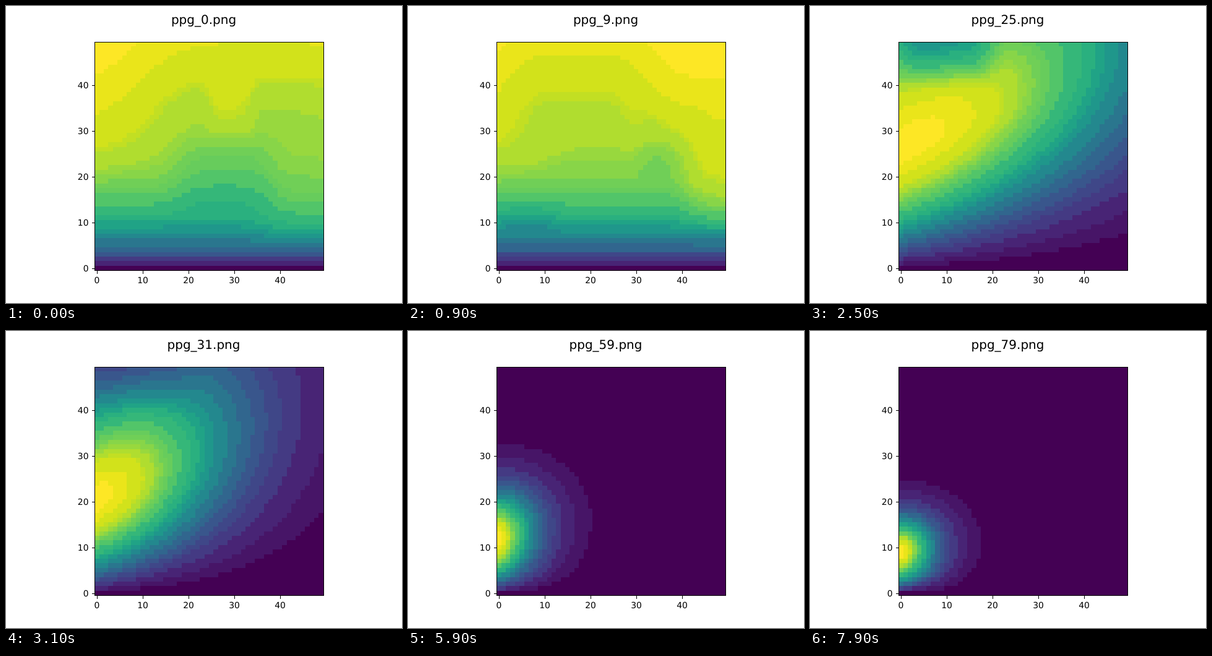
Write an HTML page with a canvas that moves like this. It is 640 by 480 pixels and loops after 8000 ms.

```html
<!DOCTYPE html>
<html lang="en">
<head>
<meta charset="utf-8">
<title>Heat map</title>
<style>
  html, body { margin: 0; width: 100%; height: 100%; overflow: hidden; background: #fff; }
  canvas, svg { position: absolute; left: 0; top: 0; display: block; }
  text {
    font-family: "DejaVu Sans", sans-serif; font-size: 13.89px; fill: #000;
    text-rendering: geometricPrecision;
  }
  #title { font-size: 20px; text-anchor: middle; }
  path { fill: none; stroke: #000; stroke-width: 1; shape-rendering: crispEdges; }
</style>
</head>
<body>
<canvas id="map" width="640" height="480"></canvas>
<svg id="axes" width="640" height="480" viewBox="0 0 640 480">
  <path d="M143.5 58.5H513.5V427.5H143.5Z"/>
  <text id="title" x="319.5" y="29"></text>
</svg>
<script>
const N = 50, FRAMES = 80, STEP = 100;
const LEFT = 143.2, BOTTOM = 427.2, CELL = 7.392;

// Colour bands: lower bound and fill
const BANDS = [
  [0, '#440154'], [.03, '#471567'], [.075, '#482475'], [.14, '#443a83'],
  [.205, '#3f4788'], [.26, '#39568c'], [.32, '#31668e'], [.385, '#2a768e'],
  [.45, '#23888e'], [.52, '#1f978b'], [.57, '#20a386'], [.615, '#2ab07f'],
  [.66, '#35b779'], [.72, '#52c569'], [.77, '#67cc5c'], [.795, '#70cf57'],
  [.82, '#88d548'], [.845, '#98d83e'], [.86, '#b0dd2f'], [.895, '#c2df23'],
  [.905, '#d2e21b'], [.953, '#eae51a'], [.985, '#fde725']
];

const mix = (a, b, w) => a + (b - a) * w;

// Smooth flat-topped hill
function hill(x, y, { cx, cy, wx, wy, rise }) {
  return rise * Math.exp(-(((x - cx) / wx) ** 4) - ((y - cy) / wy) ** 4);
}

function makeField(valueAt) {
  const field = Array.from({ length: N * N }, (_, i) => valueAt(i % N, Math.floor(i / N)));
  const top = Math.max(...field);
  return field.map(v => v / top);
}

// Saturating layers, pushed up or down by hills
function layers(...hills) {
  return makeField((x, y) => {
    const depth = hills.reduce((d, h) => d - hill(x, y, h), y);
    return 1 - Math.exp(-Math.pow(Math.max(0, depth) / 11.2, .93));
  });
}

// One source at the left edge, with its ridge leaning upwards
function blob({ centre, slope, spread, reach, power, skew, notch }) {
  const dent = { cx: 10, cy: 54, wx: 10, wy: 12, rise: notch };
  return makeField((x, y) => {
    const c = centre + slope * x;
    const d = y - c;
    const shape = d > 0
      ? Math.exp(-d * d / (2 * spread * spread))
      : Math.pow(1 - (d / c) ** 2, 1 + skew * x);
    return shape * Math.exp(-Math.pow(x / reach, power)) - hill(x, y, dent);
  });
}

const PLUME = { centre: 26, slope: .48, spread: 28, reach: 57, power: 2.4, skew: .025, notch: .25 };
const WIDE = { centre: 16.5, slope: .45, spread: 11.4, reach: 14.2, power: 1.7, skew: .04, notch: 0 };
const MID = { centre: 12, slope: .2, spread: 7.7, reach: 9, power: 1.55, skew: .04, notch: 0 };
const SMALL = { centre: 9, slope: .12, spread: 5.9, reach: 8.2, power: 1.65, skew: .04, notch: 0 };

const blends = [
  { at: 0, field: layers(
    { cx: 36, cy: 54, wx: 30, wy: 27, rise: 17 },
    { cx: 29, cy: 38, wx: 5, wy: 8, rise: -4 },
    { cx: 28, cy: 20, wx: 11, wy: 8, rise: 3.5 },
    { cx: 50, cy: 11, wx: 14, wy: 7, rise: -2 }) },
  { at: 9, field: layers(
    { cx: 17, cy: 50, wx: 18, wy: 21, rise: 14 },
    { cx: 38, cy: 29, wx: 7, wy: 8, rise: 4 },
    { cx: 51, cy: 20, wx: 10, wy: 10, rise: -6 },
    { cx: 24, cy: 24, wx: 14, wy: 4, rise: 2 },
    { cx: 6, cy: 11, wx: 7, wy: 4, rise: 1.5 }) },
  { at: 17, field: layers(
    { cx: 20, cy: 32, wx: 32, wy: 25, rise: 4.5 },
    { cx: 3, cy: 60, wx: 16, wy: 28, rise: 17 },
    { cx: 22, cy: 58, wx: 14, wy: 18, rise: 10 },
    { cx: 40, cy: 33, wx: 8, wy: 6, rise: 2.5 },
    { cx: 6, cy: 13, wx: 5, wy: 3, rise: 1.5 }) },
  { at: 25, field: blob(PLUME) }
];

const shrinks = [
  { at: 25, end: 42, from: PLUME, to: WIDE, tau: 8.5 },
  { at: 42, end: 59, from: WIDE, to: MID, tau: 9.4 },
  { at: 59, end: 79, from: MID, to: SMALL, tau: 12 }
];

function blend(n) {
  const k = blends.findIndex(b => b.at > n);
  const a = blends[k - 1], b = blends[k];
  const w = (n - a.at) / (b.at - a.at);
  const log = v => Math.log(Math.max(v, 1e-4));
  return makeField((x, y) => {
    const i = y * N + x;
    return Math.exp(mix(log(a.field[i]), log(b.field[i]), w));
  });
}

// Parameters settle exponentially
function shrink(n) {
  const { at, end, from, to, tau } = shrinks.find(s => n <= s.end);
  const w = (1 - Math.exp((at - n) / tau)) / (1 - Math.exp((at - end) / tau));
  const shape = {};
  for (const key in from) shape[key] = mix(from[key], to[key], w);
  return blob(shape);
}

function colour(v) {
  let i = BANDS.length - 1;
  while (i > 0 && v < BANDS[i][0]) i--;
  return BANDS[i][1];
}

const ctx = document.getElementById('map').getContext('2d');
const title = document.getElementById('title');
const edgeX = i => Math.round(LEFT + i * CELL);
const edgeY = i => Math.round(BOTTOM - i * CELL);

function draw(n) {
  const field = n < 25 ? blend(n) : shrink(n);
  field.forEach((v, i) => {
    const x = i % N, y = Math.floor(i / N);
    ctx.fillStyle = colour(v);
    ctx.fillRect(edgeX(x), edgeY(y + 1), edgeX(x + 1) - edgeX(x), edgeY(y) - edgeY(y + 1));
  });
  title.textContent = `ppg_${n}.png`;
}

function buildTicks() {
  let out = '';
  for (let v = 0; v < N; v += 10) {
    const x = Math.round(LEFT + (v + .5) * CELL);
    const y = Math.round(BOTTOM - (v + .5) * CELL);
    out += `<path d="M${x + .5} 428V432.5M138.5 ${y + .5}H143"/>` +
      `<text x="${x}" y="448" text-anchor="middle">${v}</text>` +
      `<text x="133.5" y="${y + 5}" text-anchor="end">${v}</text>`;
  }
  document.getElementById('axes').insertAdjacentHTML('beforeend', out);
}

let shown = -1;
const begin = performance.now();
function tick() {
  const n = Math.floor((performance.now() - begin) / STEP) % FRAMES;
  if (n !== shown) draw(shown = n);
  requestAnimationFrame(tick);
}

buildTicks();
tick();
</script>
</body>
</html>
```
